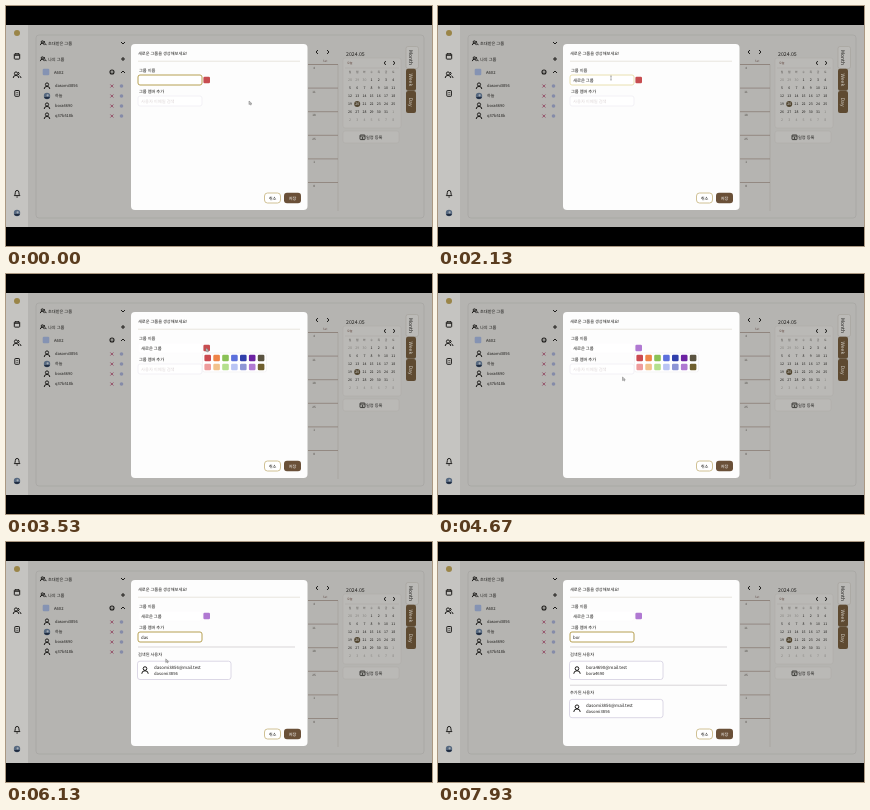
Recreate the animation shown at these times as an HTML page. Size 426 px wide and 240 px high, loop 8000 ms.

```html
<!DOCTYPE html>
<html>
<head>
<meta charset="utf-8">
<title>Create a group</title>
<style>
  html, body { margin: 0; width: 100%; height: 100%; overflow: hidden; background: #000; }
  svg { display: block; width: 100vw; height: 100vh; }
  text { font-family: "Noto Sans CJK KR", "Noto Sans CJK", sans-serif; font-weight: 500; text-rendering: geometricPrecision; white-space: pre; }
</style>
</head>
<body>
<svg viewBox="0 0 426 240"><g id="page"></g><g id="modal"></g></svg>
<script>
const LOOP = 8000, STEP = 1000 / 15;
const INK = "#1c1b19", GOLD = "#b6a052", BROWN = "#6a5038", PALE = "#f3f1f6";
const USERS = ["dasomi3856", "하늘", "bora4690", "q37b518k"];

const text = (x, y, s, size = 4.2, fill = INK, more = "") =>
  `<text x="${x}" y="${y + size * 0.36}" font-size="${size}" fill="${fill}" ${more}>${s}</text>`;
const centered = (x, y, s, size, fill, more = "") =>
  text(x, y, s, size, fill, `text-anchor="middle" ${more}`);
const box = (x, y, w, h, r, fill, stroke = "none", width = 0.8) =>
  `<rect x="${x}" y="${y}" width="${w}" height="${h}" rx="${r}" fill="${fill}" stroke="${stroke}" stroke-width="${width}"/>`;
const path = (d, stroke = INK, width = 1, fill = "none") =>
  `<path d="${d}" stroke="${stroke}" stroke-width="${width}" fill="${fill}" stroke-linejoin="round"/>`;
const circle = (x, y, r, fill, stroke = "none", width = 1) =>
  `<circle cx="${x}" cy="${y}" r="${r}" fill="${fill}" stroke="${stroke}" stroke-width="${width}"/>`;
const swatch = (x, y, fill) => box(x - 3.3, y - 3.3, 6.6, 6.6, 1.2, fill);
const chevron = (x, y, dx, dy) => dx
  ? path(`M${x - dx} ${y - 2}L${x + dx} ${y}L${x - dx} ${y + 2}`)
  : path(`M${x - 2} ${y - dy}L${x} ${y + dy}L${x + 2} ${y - dy}`);
const person = (x, y, k = 1) =>
  circle(x, y - 1.5 * k, 1.6 * k, "none", INK) +
  path(`M${x - 2.8 * k} ${y + 3 * k}q0 ${-2.6 * k} ${2.8 * k} ${-2.6 * k}t${2.8 * k} ${2.6 * k}`);
const people = (x, y, k) => person(x - k, y, k) +
  path(`M${x + 1.2 * k} ${y - 3 * k}q2 1.4 0 ${3 * k}M${x + 2.4 * k} ${y + 0.8 * k}q1.6 .6 1.6 ${2.2 * k}`);
const photo = (x, y) => circle(x, y, 3.2, "#56687f") +
  `<path d="M${x - 3} ${y + 1}h6a3.2 3.2 0 0 1-6 0z" fill="#202c40"/>` + circle(x + 0.6, y - 0.7, 1.1, "#a5adb5");

function sidebar() {
  return box(0, 19, 22, 202, 0, "#c5c4c1") + circle(11, 27, 3, "#9a8548") +
    box(8.3, 47.9, 5.4, 5.2, 0.7, "none", INK, 1) + path("M8.3 49.2h5.4M9.8 46.9v1.6M12.2 46.9v1.6", INK, 1.1) +
    people(11, 69, 1) +
    box(8.8, 84.5, 4.6, 5.8, 0.6, "none", INK, 1) + path("M10.2 86.5h2M10.2 88.3h2", INK, 0.6) +
    path("M8.3 189.6q1-1 1-3q0-2.2 1.8-2.2t1.8 2.2q0 2 1 3zM10.4 191h1.4") + photo(11, 207);
}

function groups() {
  let s = people(37, 37, 0.7) + text(42, 37, "초대받은 그룹") + chevron(117, 37, 0, 1) +
    people(37, 53, 0.7) + text(42, 53, "나의 그룹") + path("M115 53h4M117 51v4") +
    swatch(40, 66, "#8593b3") + text(48, 66, "A602") +
    circle(106, 66, 2, "none", INK, 1.1) + circle(106, 66, 0.6, INK) + chevron(117, 66, 0, -1);
  USERS.forEach((name, i) => {
    const y = 80 + i * 10;
    s += (i === 1 ? photo(41, y) : person(41, y)) + text(49, y, name, 4) +
      path(`M104.4 ${y - 1.5}l3 3m0-3l-3 3`, "#8d3d5a", 0.8) + circle(115.5, y, 1.8, "#858ba8");
  });
  return s;
}

function calendar() {
  const bold = 'font-weight="700"';
  let s = chevron(311, 46, -0.9) + chevron(322, 46, 0.9) + centered(319, 55, "Sat", 3, "#705c58") +
    path("M302 58.5H332V205", "#a29e99", 0.6);
  [4, 11, 18, 25, 1, 8].forEach((day, i) => {
    const y = 58.5 + i * 23.6;
    s += path(`M302 ${y}H332`, "#86786f", 0.7) + centered(308, y + 3.5, day, 3, "#4a443f");
  });
  s += text(340, 48, "2024.05", 5.2, INK, bold) +
    box(337, 52, 58, 70, 2, "#bab9b6", "#adaba7", 0.5) +
    text(341, 57, "오늘", 3, "#5c3e36") + chevron(379, 57, -0.7) + chevron(388, 57, 0.7) +
    path("M339 62H393", "#a8a6a0", 0.5);
  [..."일월화수목금토"].forEach((d, i) => s += centered(344 + i * 7.2, 66, d, 2.8, "#56534f"));
  s += circle(351.2, 98, 3, "#51452f");
  for (let i = 0; i < 42; i++) {
    const n = i - 2, out = n < 1 || n > 31, day = n < 1 ? n + 30 : n > 31 ? n - 31 : n;
    s += centered(344 + i % 7 * 7.2, 74 + Math.floor(i / 7) * 8, day, 3.5,
      n === 20 ? "#ddd" : out ? "#85837f" : INK, out ? "" : bold);
  }
  s += box(337, 125, 56, 12, 2, "#bab9b6", "#adaba7", 0.5) +
    box(354, 129, 5, 4.6, 0.6, "none", INK) + path("M354 130.2h5M356.5 131v2M355.5 132h2", INK, 0.6) +
    text(360, 131.3, "일정 등록", 4.2, INK, bold);
  ["Month", "Week", "Day"].forEach((label, i) => {
    const y = 40.5 + i * 22.3;
    s += box(400, y, i ? 10 : 12.5, 22, 2, i ? "#5e4a31" : "#bbbab7", i ? "none" : "#a5a29b", 0.6) +
      centered(0, 0, label, 5, i ? "#d5d2ca" : INK, `transform="translate(404.7 ${y + 11}) rotate(90)"`);
  });
  return s;
}

document.getElementById("page").innerHTML =
  box(0, 19, 426, 202, 0, "#b5b4b1") + sidebar() +
  box(30, 29, 388, 183, 3, "none", "#a3a19f", 0.6) + groups() + calendar();

const latest = (t, keys) => keys.filter(k => k[0] <= t).pop()[1];
const groupName = [[0, ""], [870, "ㅅ"], [950, "새"], [1070, "샐"], [1130, "새로"], [1190, "새롱"], [1330, "새로우"],
  [1400, "새로운"], [1600, "새로운 ㄱ"], [1670, "새로운 그"], [1800, "새로운 글"], [1870, "새로운 그루"], [1950, "새로운 그룹"]];
const typed = (start, name, gap) => [1, 2, 3].map(n => [start + (n - 1) * gap, name.slice(0, n)]);
const query = [[0, ""], ...typed(5450, USERS[0], 200), [7150, ""], ...typed(7350, USERS[2], 170)];
const palette = ["#cb4a50", "#ee8347", "#8ac155", "#5c70dc", "#303fab", "#6c22a2", "#5a5341",
  "#ee9c9c", "#f2c28c", "#b4e08d", "#b9c4f4", "#8d95d5", "#b079d2", "#70602f"];
const pointerKeys = [[0, 243, 95], [300, 243, 95], [750, 173, 72], [2700, 173, 72], [3150, 200, 74], [3600, 200, 74],
  [4050, 246, 92], [4300, 246, 92], [4650, 184.5, 103], [4850, 184.5, 103], [5100, 165, 95],
  [5850, 165, 95], [6100, 159.5, 118], [6850, 159.5, 118], [7100, 165, 95], [8000, 165, 95]];

function pointer(t) {
  if ((t > 5400 && t < 5850) || t > 7200) return "";
  const i = pointerKeys.findIndex(k => k[0] > t), a = pointerKeys[i - 1], b = pointerKeys[i];
  const u = (t - a[0]) / (b[0] - a[0]), e = u * u * (3 - 2 * u);
  const x = a[1] + (b[1] - a[1]) * e, y = a[2] + (b[2] - a[2]) * e;
  const overInput = x > 132 && x < 196 && ((y > 69 && y < 79) || (y > 90 && y < 100));
  return overInput
    ? path(`M${x - 0.7} ${y - 2}h1.4M${x} ${y - 2}v4M${x - 0.7} ${y + 2}h1.4`, "#666", 0.5)
    : path(`M${x} ${y}v3.6l.9-.8l.7 1.3l.7-.3l-.6-1.3h1.1z`, "#777", 0.5, "#ccc");
}

const input = (y, value, border, hint = "") =>
  box(132, y, 64, 10, 2, "#fff", border, 1) + text(135, y + 5, value || hint, 4.3, value ? INK : "#dcd5d6");
const section = (y, title, name) =>
  path(`M132 ${y}H289`, "#c9c5c8", 0.7) + text(132, y + 7, title) +
  (name ? box(131.5, y + 14.2, 93.5, 18.3, 2.5, "#fff", "#d3cfe0") + person(139, y + 23.3, 1.15) +
    text(148, y + 20, name + "@mail.test", 4.4) + text(148, y + 26.6, name) : "");

function modal(t) {
  const nameBorder = t < 2000 ? GOLD : t < 2800 ? "#e9e0b0" : "#fdfcfd";
  let s = box(125, 38, 176.5, 166, 4, "#fdfdfd") + text(132, 47.5, "새로운 그룹을 생성해보세요!", 4.2) +
    path("M132 55.2H294", "#dedad0", 0.7) + text(133, 64, "그룹 이름") +
    input(69, latest(t, groupName), nameBorder) + swatch(200.7, 74, t < 4200 ? "#c74d50" : "#b079d2") +
    text(133, 85, "그룹 멤버 추가") +
    input(90, latest(t, query), t < 5150 ? PALE : GOLD, "사용자 이메일 검색");
  if (t >= 3300 && t < 5150) {
    s += box(196.5, 79, 64, 19, 2, "#fff", "#eeecef", 0.6);
    palette.forEach((c, i) => s += swatch(201.7 + i % 7 * 8.9, 84 + Math.floor(i / 7) * 9, c));
  }
  if (t >= 5950) s += section(105, "검색된 사용자", t < 7200 ? USERS[0] : t < 7650 ? "" : USERS[2]);
  if (t >= 6700) s += section(143.2, "추가된 사용자", USERS[0]);
  return s + box(258.5, 187, 16, 10, 3, "#fff", "#c4b27a") + centered(266.5, 192, "취소", 4.2, INK) +
    box(278, 186.7, 17, 10.6, 3, BROWN) + centered(286.5, 192, "저장", 4.2, "#fff") + pointer(t);
}

const layer = document.getElementById("modal"), start = performance.now();
let shown = -1;
function tick() {
  const step = Math.floor((performance.now() - start) % LOOP / STEP);
  if (step !== shown) layer.innerHTML = modal((shown = step) * STEP);
  requestAnimationFrame(tick);
}
tick();
</script>
</body>
</html>
```
